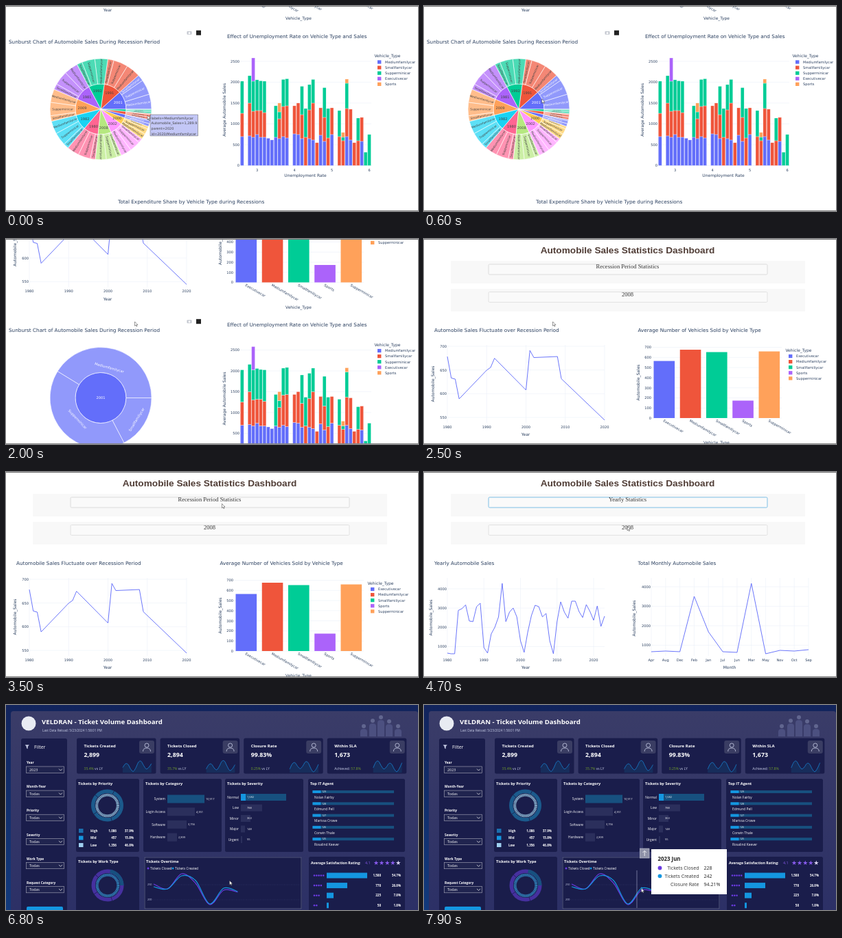
An HTML page for the animation above (8 s loop, 600 by 300 pixels).

```html
<!DOCTYPE html>
<html lang="en">
<head>
<meta charset="utf-8">
<title>Dashboards</title>
<style>
html, body { margin: 0; width: 100%; height: 100%; overflow: hidden; background: #fff; }
svg { display: block; width: 100vw; height: 100vh; }
text { white-space: pre; }
#light { font-family: "DejaVu Sans", sans-serif; }
#dash { font-family: "Open Sans", sans-serif; }
.head { font: bold 13.63px "Liberation Sans", sans-serif; }
.pick { font-family: "Liberation Serif", serif; }
</style>
</head>
<body>
<svg id="stage" viewBox="0 0 600 300"></svg>
<script>
const INK = '#2a3f5f', GRID = '#ebf0f8';
const [BLUE, RED, GREEN, PURPLE, ORANGE] = ['#636efa', '#ef553b', '#00cc96', '#ab63fa', '#ffa15a'];
const MED = 'Mediumfamilycar', SMALL = 'Smallfamiliycar', SUP = 'Supperminicar', EXEC = 'Executivecar';

// Drawing helpers; text is centred vertically on y
const text = (x, y, s, size = 5.1, fill = INK, anchor = 'start', more = '') =>
  `<text x="${x}" y="${y}" dy=".36em" font-size="${size}" fill="${fill}" text-anchor="${anchor}" ${more}>${s}</text>`;
const turned = (x, y, s, angle, size, fill = INK, anchor = 'middle') =>
  text(x, y, s, size, fill, anchor, `transform="rotate(${angle} ${x} ${y})"`);
const bold = (x, y, s, size, fill = '#fff', anchor = 'start') => text(x, y, s, size, fill, anchor, 'font-weight="700"');
const rect = (x, y, w, h, fill, more = '') => `<rect x="${x}" y="${y}" width="${w}" height="${h}" fill="${fill}" ${more}/>`;
const dot = (x, y, r, fill, more = '') => `<circle cx="${x}" cy="${y}" r="${r}" fill="${fill}" ${more}/>`;
const path = (d, stroke, width, fill = 'none', more = '') =>
  `<path d="${d}" stroke="${stroke}" stroke-width="${width}" fill="${fill}" stroke-linejoin="round" ${more}/>`;
const each = (list, fn) => list.map(fn).join('');
const polyline = pts => 'M' + pts.map(p => p.join(' ')).join('L');

function spline(pts) {
  const at = i => pts[Math.max(0, Math.min(pts.length - 1, i))];
  let d = 'M' + pts[0];
  for (let i = 0; i < pts.length - 1; i++) {
    const [a, b, c, e] = [at(i - 1), at(i), at(i + 1), at(i + 2)];
    d += `C${[0, 1].map(k => b[k] + (c[k] - a[k]) / 6)} ${[0, 1].map(k => c[k] - (e[k] - b[k]) / 6)} ${c}`;
  }
  return d;
}

// Ring sector, counter-clockwise from the right, in degrees
function sector(cx, cy, r0, r1, a0, a1, fill, stroke = 'none', more = '') {
  if (!r0 && a1 - a0 >= 359.99) return dot(cx, cy, r1, fill, `stroke="${stroke}" stroke-width=".6" ${more}`);
  const pt = (r, a) => `${cx + r * Math.cos(a * Math.PI / 180)} ${cy - r * Math.sin(a * Math.PI / 180)}`;
  const big = +(a1 - a0 > 180);
  return path(`M${pt(r1, a0)}A${r1} ${r1} 0 ${big} 0 ${pt(r1, a1)}L${pt(r0, a1)}` +
    (r0 ? `A${r0} ${r0} 0 ${big} 1 ${pt(r0, a0)}` : '') + 'Z', stroke, .6, fill, more);
}

// Chart parts
const title = (x, y, s) => text(x, y, s, 7.27);
const axisTitle = (x, y, s) => text(x, y, s, 5.96, INK, 'middle');
const sideTitle = (x, y, s) => turned(x, y, s, -90, 5.96);
const xTicks = (x, step, labels, top, bottom) => each(labels, (s, i) =>
  (top ? path(`M${x + i * step} ${top}V${bottom}`, GRID, .6) : '') + text(x + i * step, bottom + 6, s, 5.1, INK, 'middle'));
const yTicks = (y, step, labels, left, right) => each(labels, (s, i) =>
  path(`M${left} ${y + i * step}H${right}`, GRID, .6) + text(left - 1, y + i * step, s, 5.1, INK, 'end'));
const legend = (x, y, items, colors, head) => (head ? text(x - 4.5, y - 9, head, 5.96) : '') +
  each(items, (s, i) => rect(x, y + i * 8.1 - 2.6, 5.4, 5.2, colors[i]) + text(x + 11, y + i * 8.1, s));
const curve = pts => path(polyline(pts), BLUE, .95);

function stackedBars() {
  // Tops per stack, in the order of the colours; 0 leaves a colour out
  const stacks = '191 157 110||190 142 102|192 154 110 76|188 153 108|192 153 109.5|192 156 110|193.5|196|192 0 146|' +
    '194 165 155 0 142|191 147 107.5|193 146 106.5||187 146|188 142|194 159 117.5|0 192 150|194 152 115|196 142 107.5|' +
    '0 200|189 149|198 163 119.5|0 193 150|188 149||0 191 153|0 197 192 0 185|191 150 113 0 107|196 151|0 200|' +
    '0 197 164|198 163|0 0 214|0 0 188';
  const colors = [BLUE, RED, GREEN, PURPLE, ORANGE];
  return each(stacks.split('|'), (stack, i) => {
    let base = 233.5;
    return each(stack ? stack.split(' ').map(Number) : [], (top, k) => {
      if (!top) return '';
      const bar = rect(341.3 + i * 5.45, top + 280, 4.9, base - top, colors[k], 'stroke="#fff" stroke-width=".3"');
      base = top;
      return bar;
    });
  });
}

const YEARS = [[2001, 42, BLUE], [1991, 40, RED], [1992, 36, GREEN], [1981, 39, PURPLE], [2009, 37, ORANGE],
  [1982, 36, '#19d3f3'], [1980, 34, '#ff6692'], [2008, 30, '#b6e880'], [2002, 30, '#ff97ff'],
  [2000, 16, '#fecb52'], [1990, 8, BLUE], [1983, 7, RED], [2020, 5, GREEN]];
const LEAVES = [[MED, 0, .412, 46], [SUP, .412, .826, 46], [SMALL, .826, 1, 61]];
const mix = (a, b, p) => a + (b - a) * p;
const upright = a => ((a + 90) % 180 + 180) % 180 - 90;

function sunburst(p) {
  const cx = 138, cy = 431, polar = (r, a) =>
    [cx + r * Math.cos(a * Math.PI / 180), cy - r * Math.sin(a * Math.PI / 180)];
  let start = 0, shapes = '', labels = '';
  YEARS.forEach(([year, size, color], i) => {
    const a0 = i ? mix(start, 360, p) : 0, a1 = mix(start + size, 360, p), span = a1 - a0;
    start += size;
    if (span < .05) return;
    const ink = color === BLUE ? '#fff' : '#444';
    shapes += sector(cx, cy, 0, 37, a0, a1, color, '#fff');
    if (span > 14) labels += text(...polar(27 * (i ? 1 : 1 - p ** 3), (a0 + a1) / 2), year, 5.1, ink, 'middle');
    for (const [name, u0, u1, rest] of LEAVES) {
      const b0 = a0 + span * u0, b1 = a0 + span * u1, mid = (b0 + b1) / 2, half = (u0 + u1) / 2;
      shapes += sector(cx, cy, 37, 74, b0, b1, color, '#fff', 'fill-opacity=".7"');
      const fit = Math.min(4.2, .8 * (b1 - b0));
      if (fit < 1.2) continue;
      labels += i
        ? turned(...polar(55.5, mid), name, upright(-mid), fit, ink)
        : turned(...polar(mix(55.5, rest, p), mid), name,
            mix(-size * half, upright(90 - 360 * half), p), mix(fit, 5.1, p), ink);
    }
  });
  return shapes + labels;
}

const panel = y => rect(39, y, 516, 33, '#f8f8f8');
const header = `<text class="head" x="296.5" y="21" fill="#503d36" text-anchor="middle">Automobile Sales Statistics Dashboard</text>` +
  panel(32) + panel(73) +
  rect(94, 37, 406, 15, '#fafafa', 'id="box" rx="1.5" stroke="#d4d4d4" stroke-width=".8"') +
  rect(94, 77.5, 406, 15, '#fafafa', 'rx="1.5" stroke="#dcdcdc" stroke-width=".8"') +
  text(296.5, 40, '', 8.52, '#333', 'middle', 'class="pick" id="choice"') +
  text(296.5, 80.5, '2008', 8.52, '#333', 'middle', 'class="pick"');

const kinds = [EXEC, MED, SMALL, 'Sports', SUP], palette = [BLUE, RED, GREEN, PURPLE, ORANGE];
const recession =
  title(15, 133, 'Automobile Sales Fluctuate over Recession Period') +
  xTicks(34, 57.25, [1980, 1990, 2000, 2010, 2020], 155, 269) + yTicks(157, 34.7, [700, 650, 600, 550], 34, 263) +
  axisTitle(148, 286, 'Year') + sideTitle(13, 212, 'Automobile_Sales') +
  curve([[0, 172], [1, 203.5], [2, 205], [3, 234], [10, 192], [11, 188], [12, 174.5], [20, 221], [21, 163],
    [22, 173.5], [28, 172], [29, 204.5], [40, 265]].map(([n, y]) => [34 + n * 5.725, y])) +
  title(311.5, 133, 'Average Number of Vehicles Sold by Vehicle Type') +
  yTicks(158.5, 14.8, [700, 600, 500, 400, 300, 200, 100, 0], 332, 521) +
  each([178.5, 162, 165.5, 236.5, 164.5], (y, i) => rect(334.5 + i * 38.25, y, 30.6, 262 - y, palette[i]) +
    turned(349 + i * 38.25, 265.5, kinds[i], 30, 5.1, INK, 'start')) +
  axisTitle(426, 298, 'Vehicle_Type') + sideTitle(311.5, 210, 'Automobile_Sales') +
  legend(531, 171.5, kinds, palette, 'Vehicle_Type') +
  title(4, 332, 'Sunburst Chart of Automobile Sales During Recession Period') +
  rect(263.5, 317, 7, 4.8, '#c4c8d0', 'rx=".8"') + dot(267, 319.4, 1.5, '#fff') + rect(277, 315.7, 7, 7, '#222') +
  '<g id="sun"></g>' +
  title(322, 324, 'Effect of Unemployment Rate on Vehicle Type and Sales') +
  yTicks(361, 30.5, [2500, 2000, 1500, 1000, 500, 0], 341, 532) +
  xTicks(365.5, 54.5, [3, 4, 5, 6], 0, 514) + stackedBars() +
  axisTitle(436, 528, 'Unemployment Rate') + sideTitle(317.5, 432, 'Average Automobile Sales') +
  legend(541, 362, [MED, SMALL, SUP, EXEC, 'Sports'], palette, 'Vehicle_Type') +
  title(163, 566, 'Total Expenditure Share by Vehicle Type during Recessions') +
  '<g id="tip">' + path('M210 439V470H279.5V439H210V444L206 446L210 448', '#555', .5, '#c3c7f6') +
  each(['labels=' + MED, 'Automobile_Sales=1,289.9', 'parent=2020', 'id=2020/' + MED],
    (s, i) => text(211.5, 444 + i * 7.6, s, 4.95, '#444')) + '</g>';

const yearY = [265, 266, 266, 202.5, 200, 194.5, 218, 219, 197, 192, 257, 265, 237, 227, 212, 163, 219, 205, 199, 212,
  247, 264, 234, 210, 195, 197, 212, 207, 247, 266, 219, 190, 205, 214, 189, 189, 204, 213, 194, 204, 217, 196, 226, 211];
const monthY = [263, 262, 263, 182, 234, 263, 264, 163, 266, 261, 262, 260];
const yearKinds = [MED, SMALL, 'Sports', SUP];
const slice = (from, to, color) => sector(436.5, 430.5, 0, 83, 90 - to * 3.6, 90 - from * 3.6, color);
const yearly =
  title(15, 133, 'Yearly Automobile Sales') +
  xTicks(34, 53.25, [1980, 1990, 2000, 2010, 2020], 155, 269) + yTicks(171, 28.15, [4000, 3000, 2000, 1000], 34, 263) +
  curve(yearY.map((y, i) => [34 + i * 5.325, y])) +
  axisTitle(148, 286, 'Year') + sideTitle(10, 213, 'Automobile_Sales') +
  title(311.5, 133, 'Total Monthly Automobile Sales') +
  xTicks(331, 20.82, 'Apr Aug Dec Feb Jan Jul Jun Mar May Nov Oct Sep'.split(' '), 155, 269) +
  yTicks(168, 28.5, [4000, 3000, 2000, 1000], 331, 560) + curve(monthY.map((y, i) => [331 + i * 20.82, y])) +
  axisTitle(445, 286, 'Month') + sideTitle(306, 214, 'Automobile_Sales') +
  title(4, 324, 'Average Vehicles Sold by Vehicle Type in the year 2008') +
  yTicks(362.5, 22, [4000, 3500, 3000, 2500, 2000, 1500, 1000, 500], 24, 214) +
  each([465, 486.5, 356.5, 486.5], (y, i) => rect(28.5 + i * 47.8, y, 38.3, 516.5 - y, palette[i])) +
  sideTitle(0, 431, 'Automobile_Sales') + legend(224, 362, yearKinds, palette, 'Vehicle_Type') +
  title(322, 324, 'Total Advertisement Expenditure for Each Vehicle') +
  slice(0, 44, BLUE) + slice(44, 56.9, PURPLE) + slice(56.9, 75.3, GREEN) + slice(75.3, 100, RED) +
  text(477, 423.5, '44%', 5.1, '#fff', 'middle') + text(402, 396, '24.7%', 5.1, '#444', 'middle') +
  text(392, 460, '18.4%', 5.1, '#444', 'middle') + text(435, 490, '12.9%', 5.1, '#444', 'middle') +
  legend(541, 354, yearKinds, palette);

// Dark dashboard
const CARD = '#1a1d4b', BAR = '#17507f', DIM = '#2b2f5c', SKY = '#1496e0', VIOLET = '#6a3be0', PALE = '#c9cfe8';
const card = (x, y, w, h, head) => rect(x, y, w, h, CARD, 'rx="2.5"') + (head ? bold(x + 3, y + 7, head, 5.6) : '');
const ring = (x, y, outer, inner) => dot(x, y, 20.8, 'none', `stroke="${outer}" stroke-width="5.4" stroke-dasharray="26 .7"`) +
  dot(x, y, 15.3, 'none', `stroke="${inner}" stroke-width="4" stroke-dasharray="1.6 .5"`);

const filters = card(22, 49, 67, 260) + path('M28 58.5H33.5L31.5 61V64L30 63V61Z', PALE, .3, PALE) + text(41, 61, 'Filter', 7, '#fff') +
  each(['Year', 'Month-Year', 'Priority', 'Severity', 'Work Type', 'Request Category'], (s, i) => {
    const y = 84.5 + i * 35.1;
    return bold(30, y, s, 4.8) + rect(29.5, y + 5.5, 55, 9.3, '#20244f', 'stroke="#aab" stroke-width=".6"') +
      text(34, y + 10.2, i ? 'Todas' : '2023', 5.4, '#fff') + path(`M77 ${y + 9}l2.5 2.5l2.5-2.5`, '#fff', .7);
  }) + rect(30, 295, 53, 12, SKY, 'rx="2"');

const kpis = each([['Tickets Created', '2,899', '35.4%', ' vs LY'], ['Tickets Closed', '2,894', '35.7%', ' vs LY'],
  ['Closure Rate', '99.83%', '0.25%', ' vs LY'], ['Within SLA', '1,673', '57.8%', '']], ([head, value, share, tail], i) => {
  const x = 103 + i * 121.6, wave = Array.from({ length: 12 }, (_, n) =>
    [x + 67 + n * 3.8, 89.5 + 6 * Math.sin(n * 1.25 + 2.8) + 2.5 * Math.sin(n * .6 + i)]);
  return card(x, 48.5, 115.5, 52) + bold(x + 10.5, 60, head, 6) + bold(x + 10.5, 72.5, value, 8.8) +
    text(x + 10.5, 93, (i === 3 ? 'Achieved: ' : '') + `<tspan fill="#6f9a2e">${share}</tspan>${tail}`, 5.1, PALE) +
    path(spline(wave) + `V99H${x + 67}Z`, 'none', 0, '#14406f', 'opacity=".45"') + path(spline(wave), '#1878c4', .9) +
    rect(x + 91, 52, 22, 19, '#3a3d63', 'rx="3"') + dot(x + 102, 59, 3, 'none', `stroke="${PALE}" stroke-width=".8"`) +
    path(`M${x + 96.5} 68q0-5 5.5-5t5.5 5`, PALE, .8);
});

const priority = card(102, 108, 92, 107, 'Tickets by Priority') + ring(147.5, 147, '#1b5a8c', '#86aecb') +
  each([['High', '1,086', '37.9%'], ['Mid', '457', '15.8%'], ['Low', '1,356', '46.8%']], ([s, n, share], i) => {
    const y = 184 + i * 10.5;
    return rect(106, y - 3, 6.5, 6, ['#1b6fae', SKY, '#9fd0f0'][i]) + bold(123, y, s, 4.6) +
      bold(161, y, n, 4.6, '#fff', 'end') + bold(186, y, share, 4.6, '#fff', 'end');
  });
const category = card(200, 108, 114, 107, 'Tickets by Category') +
  each([['System', '10,917', 54], ['Login Access', '4,351', 40], ['Software', '3,756', 28], ['Hardware', '2,899', 14]],
    ([s, n, w], i) => {
      const y = 137.5 + i * 18.7;
      return text(232, y, s, 4.8, '#fff', 'end') + rect(235, y - 6, w, 12, i ? DIM : BAR) + text(237 + w, y, n, 4, '#fff');
    });
const severity = card(319, 108, 114, 107, 'Tickets by Severity') +
  each([['Normal', '1,682', 66], ['Low', '788', 31], ['Minor', '363', 14], ['Major', '148', 6], ['Urgent', '55', 2]],
    ([s, n, w], i) => {
      const y = 135 + i * 15.5;
      return text(339, y, s, 4.8, '#fff', 'end') + rect(342, y - 5, w, 10, i ? DIM : BAR) +
        (i ? '' : rect(342, y - 5, 7, 10, SKY)) + text(351, y, n, 4, '#fff');
    });
const agents = card(440, 108, 141, 107, 'Top IT Agent') +
  each(['Nolan Fairby', 'Edmund Pell', 'Marissa Crowe', 'Corwin Thale', 'Rosalind Keever'], (s, i) => {
    const y = 127 + i * 17.3;
    return rect(446.5, y - 2, 118.5, 4, BAR) + rect(446.5, y - 2, 12, 4, SKY) +
      text(460, y, 129 - i, 3.6, '#fff') + text(449, y + 8, s, 4.9, '#fff');
  });
const workType = card(102, 222, 92, 90, 'Tickets by Work Type') + ring(148, 264, '#46309f', '#2f7db5') +
  sector(148, 264, 18.2, 23.5, 0, 80, BAR);
const months = ys => spline(ys.map((y, i) => [215 + i * 20.4, y]));
const overtime = card(201, 222, 230, 77, 'Tickets Overtime') + rect(202, 223, 228, 75, 'none', 'stroke="#7c82a6" stroke-width=".6"') +
  dot(207, 239, 1.5, VIOLET) + text(210, 239, 'Tickets Closed', 4.8, '#fff') +
  dot(243, 239, 1.5, SKY) + text(246, 239, 'Tickets Created', 4.8, '#fff') +
  text(206, 263, '250', 3.8, PALE) + text(206, 285, '200', 3.8, PALE) +
  path('M215 263H428M215 285H428', '#454a7a', .4, 'none', 'stroke-dasharray="1 1.5"') +
  path(months([262, 269, 247, 261, 292, 271, 274]), VIOLET, 1.2) + path(months([266, 269, 250, 257, 291, 268, 273]), SKY, 1.2);
const rating = card(441, 222, 140, 90) + bold(444, 231, 'Average Satisfaction Rating:', 5.2) + text(523, 231, '4.1', 5.4, '#8a5cf0') +
  text(535, 231, '★★★★<tspan fill="#d9d4f2">★</tspan>', 9, '#8a5cf0', 'start', 'font-family="DejaVu Sans, sans-serif"') +
  each([['1,588', '54.7%', 59], ['778', '26.8%', 30], ['225', '7.8%', 10], ['58', '1.8%', 3]], ([n, share, w], i) => {
    const y = 249.5 + i * 14.6;
    return each([0, 1, 2, 3, 4], k => k < 5 - i ? dot(449 + k * 3.3, y, 1.3, VIOLET) : '') + rect(467, y - 4, w, 8, SKY) +
      bold(546, y, n, 4.5, '#fff', 'end') + bold(575, y, share, 4.5, '#fff', 'end');
  });
const hover = '<g id="hover">' + path('M310 242V297', PALE, .5) + dot(317, 268, 1.5, SKY) + dot(317, 271, 1.5, VIOLET) +
  rect(314.5, 210, 13.5, 14, '#8f92a8', 'stroke="#c3c6d6" stroke-width=".6"') + path('M321.2 221V213.5M318.5 216l2.7-2.7l2.7 2.7', '#fff', .8) +
  rect(331, 211, 110, 66, '#fff') + bold(340.5, 225, '2023 Jun', 7.9, '#222') +
  each([['Tickets Closed', '228', VIOLET], ['Tickets Created', '242', SKY], ['Closure Rate', '94.21%', '']], ([s, n, color], i) =>
    (color ? dot(343.5, 238.5 + i * 11.8, 2.9, color) : '') + text(400.5, 238.5 + i * 11.8, s, 7.05, '#333', 'end') +
    text(407.5, 238.5 + i * 11.8, n, 7.05, '#222')) + '</g>';
const crowd = each([[521, 36], [534, 28], [546, 23], [558, 29], [571, 36]], ([x, y]) =>
  dot(x, y - 5, 3, '#61668f') + path(`M${x - 5} 46V${y + 3}q0-4 5-4t5 4V46Z`, 'none', 0, '#4c5080'));
const fade = (id, from, to) => `<linearGradient id="${id}" x2="0" y2="1"><stop stop-color="${from}"/><stop offset="1" stop-color="${to}"/></linearGradient>`;
const dash = fade('sea', '#12245c', '#123a7c') + fade('sheet', '#3a3c68', '#2c3066') +
  rect(0, 0, 600, 300, 'url(#sea)') + rect(7, 9, 593, 295, 'url(#sheet)', 'rx="4"') + dot(33, 27, 10.5, '#e8ebf2') +
  bold(52, 24.5, 'VELDRAN - Ticket Volume Dashboard', 9.65) + text(53, 37, 'Last Data Reload: 5/23/2024 1:58:01 PM', 4.7, PALE) +
  crowd + filters + kpis + priority + category + severity + agents + workType + overtime + rating + hover;

const $ = id => document.getElementById(id);
$('stage').innerHTML = `<g id="light">${rect(0, 0, 600, 300, '#fff')}<g id="page">${header}<g id="recession">${recession}</g>` +
  `<g id="yearly">${yearly}</g></g>${rect(0, 0, 600, 1, '#777')}${rect(0, 299, 600, 1, '#888')}</g><g id="dash">${dash}</g>` +
  `<g id="cursor">${path('M0 0V6.2L1.5 4.9L2.5 7.1L3.5 6.6L2.5 4.5H4.4Z', '#333', .5, '#fff')}</g>`;

// Linear keyframes: [time, ...values]
function keyed(keys, t) {
  const i = keys.findIndex(k => k[0] > t), a = keys[i - 1], b = keys[i];
  const p = (t - a[0]) / (b[0] - a[0]);
  return a.slice(1).map((v, k) => mix(v, b[k + 1], p));
}
const scrollKeys = [[0, 280], [1850, 280], [2000, 199], [2400, 0], [5450, 0], [5900, 208], [8000, 208]];
const cursorKeys = [[0, 206, 160], [300, 206, 160], [650, 166, 132], [1500, 166, 132], [2000, 187.5, 121], [2600, 187.5, 121],
  [3400, 314.5, 46.5], [4300, 314.5, 46.5], [4680, 296, 79.5], [5000, 296, 79.5], [5450, 303, 104], [6199, 303, 104],
  [6200, 380, 190], [6900, 316.5, 268], [8000, 316.5, 268]];
const show = (id, on) => $(id).setAttribute('display', on ? 'inline' : 'none');
const cubic = u => u < .5 ? 4 * u ** 3 : 1 - (2 - 2 * u) ** 3 / 2;
let zoom = -1;

function draw() {
  const t = performance.now() % 8000, byYear = t >= 4600;
  show('light', t < 6200);
  show('dash', t >= 6200);
  show('recession', !byYear);
  show('yearly', byYear);
  show('tip', t < 300);
  show('hover', t >= 6900);
  $('page').setAttribute('transform', `translate(0 ${-keyed(scrollKeys, t)[0]})`);
  $('cursor').setAttribute('transform', `translate(${keyed(cursorKeys, t)})`);
  $('box').setAttribute('stroke', t >= 3800 ? '#5fb0e0' : '#d4d4d4');
  $('choice').textContent = byYear ? 'Yearly Statistics' : 'Recession Period Statistics';
  const p = cubic(Math.max(0, Math.min(1, (t - 690) / 750)));
  if (p !== zoom) $('sun').innerHTML = sunburst(zoom = p);
  requestAnimationFrame(draw);
}
draw();
</script>
</body>
</html>
```
